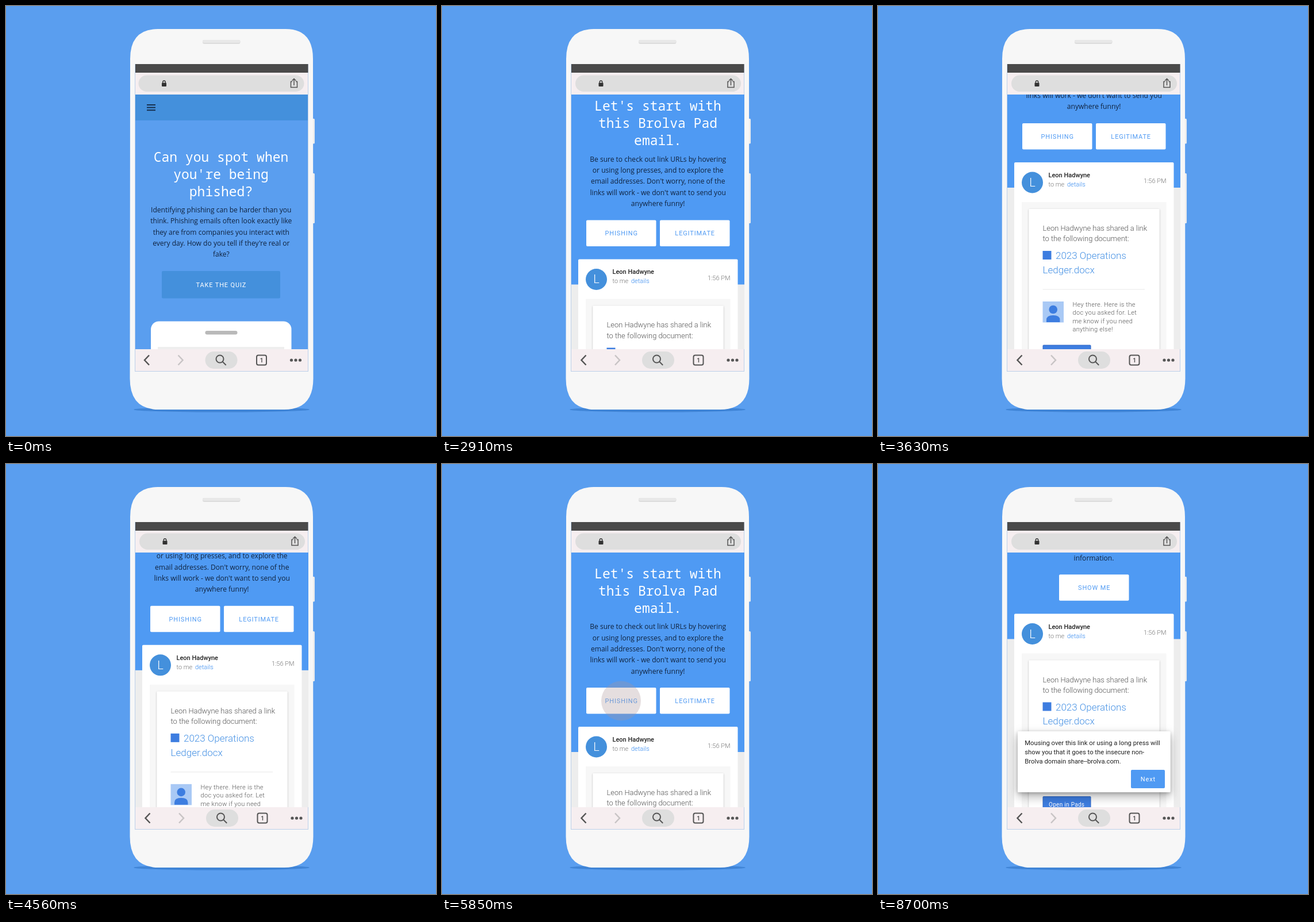
An HTML page for the animation above (9.78 s loop, 748 px wide and 748 px high).

```html
<!DOCTYPE html>
<html lang="en">
<head>
<meta charset="utf-8">
<style>
  html, body { margin: 0; height: 100%; overflow: hidden; background: #5a9eef; }
  svg { display: block; width: 100vw; height: 100vh; }
  text { font: 300 11px Roboto, sans-serif; white-space: pre; }
  .mid { text-anchor: middle; }
  .title { font: 300 23px "Noto Sans Mono", monospace; fill: #fff; }
  .para { font: 400 12.06px "Open Sans", sans-serif; fill: #10233f; }
  .label { font-weight: 400; letter-spacing: .85px; fill: #4f9af3; }
  .share { font-size: 12.9px; fill: #555; }
  .file { font-size: 17px; fill: #4490e4; }
  .note { letter-spacing: .3px; fill: #555; }
  .tip { font-size: 11.25px; font-weight: 400; fill: #222; }
  .line { fill: none; stroke: #555; stroke-width: 2; }
</style>
</head>
<body>
<svg id="stage" viewBox="0 0 748 748" xmlns="http://www.w3.org/2000/svg"></svg>
<script>
const LOOP = 9780, QUIZ_AT = 2310, RESULT_AT = 6360;
const stage = document.getElementById('stage');

const rect = (x, y, w, h, fill, rx = 0, more = '') =>
  `<rect x="${x}" y="${y}" width="${w}" height="${h}" rx="${rx}" fill="${fill}" ${more}/>`;
const text = (x, y, cls, str, more = '') =>
  `<text x="${x}" y="${y}" class="${cls}" ${more}>${str}</text>`;
const lines = (x, y, step, cls, list) =>
  list.map((str, i) => text(x, y + i * step, cls, str)).join('');
const titles = (x, y, list) => lines(x, y, 30, 'title mid', list);
const paras = (x, y, list) => lines(x, y, 19.3, 'para mid', list);
const button = (x, y, w, h, label, fill = '#fff', color = '#4f9af3') =>
  rect(x, y, w, h, fill, 2) +
  text(x + w / 2 + .4, y + h / 2 + 4, 'label mid', label, `style="fill:${color}"`);

const phone = `
  <ellipse cx="375" cy="702" rx="153" ry="4.5" fill="#3f84d6"/>
  ${rect(530, 196, 7, 43.5, '#ececec', 1.5)}${rect(530, 291, 7, 87, '#ececec', 1.5)}
  <path d="M264 40H486Q534 40 534 92L534.5 648Q534.5 702 484 702H266Q215.500 702 215.500 648L216 92Q216 40 264 40Z" fill="#f7f7f7"/>
  ${rect(342, 59, 65.5, 7, '#dcdcdc', 3)}${rect(342, 59, 65.5, 5, '#e8e8e8', 2.5)}
  ${rect(224.5, 101.5, 301, 534, '#f6eef0', 0, 'stroke="#bcd0ea"')}
  ${rect(225, 101, 300.5, 15, '#4a4a4a')}`;

const browser = `
  ${rect(230.5, 120.5, 288, 28.5, '#dedede', 14.2)}
  ${rect(271, 133.5, 8, 6.5, '#333', 1)}
  <path d="M272.700 134v-1.700a2.300 2.300 0 0 1 4.600 0v1.700" class="line" style="stroke:#333;stroke-width:1.300"/>
  <path d="M498 131.500h-2.500v10h11v-10h-2.500M501 138v-11M497.500 130l3.500-3.500 3.500 3.500" class="line" style="stroke-width:1.500"/>
  <path d="M249 607.500l-8 8.500 8 8.500" class="line" style="stroke-width:2.500"/>
  <path d="M299.500 607.500l8 8.500-8 8.500" class="line" style="stroke:#c8c4c5;stroke-width:2.500"/>
  ${rect(346.5, 601, 56, 30, '#dedede', 15)}
  <circle cx="372" cy="614" r="6.500" class="line"/><path d="M376.700 618.700l6 6" class="line"/>
  ${rect(436, 607.5, 17, 17, 'none', 3, 'stroke="#555" stroke-width="2"')}
  ${text(444.5, 619.7, 'mid', '1', 'style="font-weight:700;font-size:10px" fill="#555"')}
  ${[496.5, 504, 511.5].map(x => `<circle cx="${x}" cy="616" r="2.600" fill="#555"/>`).join('')}`;

const intro = `
  ${rect(225, 154, 300, 443, '#5a9eef')}${rect(225, 154, 300, 45, '#4490dc')}
  ${[171, 175.6, 180.2].map(y => rect(245, y, 15, 2, '#17304f')).join('')}
  ${titles(374, 270.7, ['Can you spot when', "you're being", 'phished?'])}
  ${paras(374.3, 359, ['Identifying phishing can be harder than you',
    'think. Phishing emails often look exactly like', 'they are from companies you interact with',
    "every day. How do you tell if they're real or", 'fake?'])}
  ${button(271, 461, 206, 47.5, 'TAKE THE QUIZ', '#4490dc', '#fff')}
  ${rect(252, 548.5, 244.5, 70, '#fff', 14)}${rect(346.5, 565, 56, 6.5, '#b9b9b9', 3.2)}
  ${rect(264, 593, 220, 10, '#eee')}`;

const question = `
  ${titles(375.5, 199, ["Let's start with", 'this Brolva Pad', 'email.'])}
  ${paras(375.7, 287.3, ['Be sure to check out link URLs by hovering',
    'or using long presses, and to explore the', "email addresses. Don't worry, none of the",
    "links will work - we don't want to send you", 'anywhere funny!'])}
  ${button(251, 389, 121.5, 45.5, 'PHISHING')}${button(379, 389, 121.5, 45.5, 'LEGITIMATE')}`;

const answer = `
  ${titles(375.5, 199, ['This is actually a', 'phishing email.'])}
  ${paras(375.5, 257.6, ['The URL looks correct, but is actually a',
    'look-alike. Be cautious about hyperlinks', 'and attachments you open from emails —',
    'they may direct you to fraudulent websites', "where you're asked to input sensitive", 'information.'])}
  ${button(315, 378.3, 121.5, 45.5, 'SHOW ME')}`;

// Mail card, with its top edge at y = 0
const mail = `
  ${rect(225, 44, 301, 600, '#ededed')}
  ${rect(237, 0, 277.5, 600, '#fff', 2)}
  <circle cx="268.500" cy="35" r="18.500" fill="#4490dc"/>
  ${text(268.5, 42, 'mid', 'L', 'style="font-size:20px" fill="#fff"')}
  ${text(296.5, 26, '', 'Leon Hadwyne', 'style="font-weight:500" fill="#222"')}
  ${text(296.5, 42, '', 'to me', 'fill="#777"')}${text(329, 42, '', 'details', 'fill="#2f86ee"')}
  ${text(501.5, 36.5, '', '1:56 PM', 'text-anchor="end" fill="#777"')}
  ${rect(250, 69, 251.5, 500, '#f7f7f7')}
  ${rect(262.5, 81, 227, 480, '#fff', 1, 'filter="url(#soft)"')}
  ${lines(286.5, 119, 18.4, 'share', ['Leon Hadwyne has shared a link', 'to the following document:'])}
  ${rect(286.5, 154, 15, 15, '#3d7de0')}
  ${text(309, 168.5, 'file', '2023 Operations')}${text(286.5, 192.7, 'file', 'Ledger.docx')}
  ${rect(286.5, 220.5, 177.5, 1, '#e8e8e8')}
  ${rect(286.5, 242, 36.5, 36.5, '#a9c9f5')}
  <circle cx="304.700" cy="256" r="7.300" fill="#3d7de0"/>
  <path d="M293 278v-4q0-8 11.700-8t11.700 8v4z" fill="#3d7de0"/>
  ${lines(338.5, 251, 14.5, 'note', ['Hey there. Here is the', 'doc you asked for. Let',
    'me know if you need', 'anything else!'])}
  ${rect(287, 318, 83, 28, '#3d7de0', 1, 'stroke="#2f66c4"')}
  ${text(297, 335.5, 'note', 'Open in Pads', 'style="font-size:10px;font-weight:400;fill:#fff"')}`;

const popup = `
  ${rect(243, 465, 265.5, 106, '#fff', 2, 'filter="url(#deep)"')}
  ${lines(255.3, 489, 16.2, 'tip', ['Mousing over this link or using a long press will',
    'show you that it goes to the insecure non-', 'Brolva domain share--brolva.com.'])}
  ${button(440, 532, 59, 32, 'Next', '#4f9af3', '#fff')}`;

stage.innerHTML = `
  <defs>
    <clipPath id="view">${rect(225, 154, 301, 443, '#000')}</clipPath>
    <filter id="soft"><feDropShadow dx="0" dy="1" stdDeviation="1.500" flood-opacity=".3"/></filter>
    <filter id="deep" x="-20%" y="-40%" width="140%" height="190%">
      <feDropShadow dx="0" dy="7" stdDeviation="9" flood-opacity=".25"/>
      <feDropShadow dx="0" dy="2" stdDeviation="3" flood-opacity=".25"/></filter>
  </defs>
  ${phone}<g id="browser">${browser}</g>
  <g clip-path="url(#view)">
    <g id="intro">${intro}</g>
    <g id="page">${rect(225, 154, 301, 443, '#4f9af3')}
      <g id="scroller"><g id="question">${question}</g><g id="answer">${answer}</g><g id="mail">${mail}</g></g>
    </g>
    <g id="popup">${popup}</g>
    <circle id="touch" r="34.500" fill="#aa9496"/>
  </g>`;

const part = Object.fromEntries([...stage.querySelectorAll('[id]')].map(el => [el.id, el]));
const show = (el, on) => el.setAttribute('display', on ? 'inline' : 'none');
const move = (el, x, y) => el.setAttribute('transform', `translate(${x} ${y})`);
const span = (t, from, to) => Math.min(1, Math.max(0, (t - from) / (to - from)));
const easeOut = p => 1 - (1 - p) ** 1.5;
const easeBoth = p => p < .5 ? (2 * p) ** 2.4 / 2 : 1 - (2 - 2 * p) ** 2.4 / 2;

const taps = [
  { x: 374, y: 485, from: 810, to: 1380 },
  { x: 311.5, y: 412, from: 5370, to: 6150 },
  { x: 376, y: 402, from: 7140, to: 7530 }
];

function draw(t) {
  const inQuiz = t >= QUIZ_AT, inResult = t >= RESULT_AT;
  show(part.intro, !inQuiz);
  show(part.page, inQuiz);
  show(part.question, !inResult);
  show(part.answer, inResult);
  move(part.browser, inQuiz ? 1.5 : 0, 0);
  move(part.mail, 0, inResult ? 446.5 : 457);

  const scroll = inResult
    ? 186 * easeBoth(span(t, 7260, 8040))
    : 194.5 * (easeBoth(span(t, 2610, 3870)) - easeOut(span(t, 4380, 5340)));
  move(part.scroller, 0, -scroll);
  part.popup.setAttribute('opacity', span(t, 7830, 8100));

  const tap = taps.find(({ from, to }) => t >= from && t < to);
  show(part.touch, tap);
  if (tap) {
    move(part.touch, tap.x, tap.y);
    const p = span(t, tap.from, tap.to);
    part.touch.setAttribute('opacity', .35 * Math.sin(Math.PI * (.12 + .88 * p)));
  }
}

const start = performance.now();
function tick() {
  draw((performance.now() - start) % LOOP);
  requestAnimationFrame(tick);
}
tick();
</script>
</body>
</html>
```
